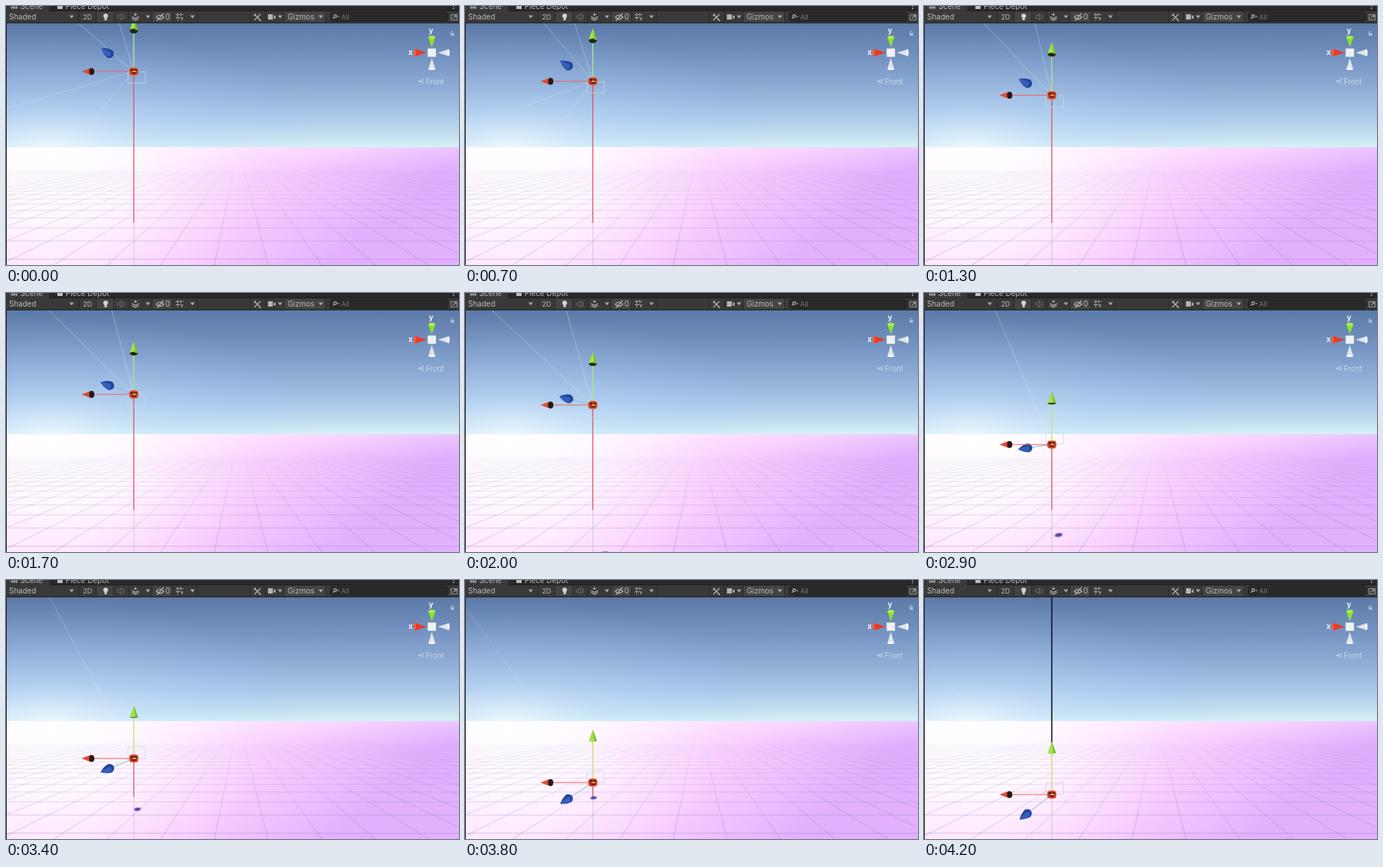
Write an HTML page that moves like this. It is 600 by 344 pixels and loops after 4500 ms.

```html
<!DOCTYPE html>
<html lang="en">
<head>
<meta charset="utf-8">
<style>
html, body { margin: 0; width: 600px; height: 344px; overflow: hidden; background: #282828; }
svg { display: block; }
text { font: 10px Inter, Roboto, sans-serif; fill: #bdbdbd; }
.small { font-size: 9px; }
.axis { font-weight: 600; fill: #fff; }
.icon { fill: none; stroke: #b4b4b4; stroke-width: 1.2; }
</style>
</head>
<body>
<svg width="600" height="344" viewBox="0 0 600 344">
  <defs>
    <linearGradient id="sky" x2="0" y2="1">
      <stop offset="0" stop-color="#5c79a7"/>
      <stop offset=".25" stop-color="#7190be"/>
      <stop offset=".5" stop-color="#8caad3"/>
      <stop offset=".75" stop-color="#aac8e8"/>
      <stop offset=".92" stop-color="#c8e2f1"/>
      <stop offset="1" stop-color="#d8f3f5"/>
    </linearGradient>
    <radialGradient id="skyGlow" gradientUnits="userSpaceOnUse" cx="0" cy="0" r="1" gradientTransform="translate(60 190) scale(360 160)">
      <stop offset="0" stop-color="#f4fbff" stop-opacity=".75"/>
      <stop offset=".35" stop-color="#c4e0ff" stop-opacity=".38"/>
      <stop offset="1" stop-color="#a0c8ff" stop-opacity="0"/>
    </radialGradient>
    <linearGradient id="ground" gradientUnits="userSpaceOnUse" x1="260" y1="180" x2="420" y2="360">
      <stop offset="0" stop-color="#ffe2ff"/>
      <stop offset=".45" stop-color="#f8cdff"/>
      <stop offset="1" stop-color="#e2b0ff"/>
    </linearGradient>
    <radialGradient id="glow" gradientUnits="userSpaceOnUse" cx="0" cy="0" r="1" gradientTransform="translate(60 200) scale(280 210)">
      <stop offset="0" stop-color="#fff"/>
      <stop offset=".4" stop-color="#fff" stop-opacity=".75"/>
      <stop offset="1" stop-color="#ffe6ff" stop-opacity="0"/>
    </radialGradient>
    <linearGradient id="haze" x2="0" y2="1">
      <stop offset="0" stop-color="#fff" stop-opacity=".25"/>
      <stop offset="1" stop-color="#fff" stop-opacity="0"/>
    </linearGradient>
    <linearGradient id="gridFade" gradientUnits="userSpaceOnUse" x1="0" y1="203" x2="0" y2="344">
      <stop offset="0" stop-color="#8478b4" stop-opacity="0"/>
      <stop offset=".35" stop-color="#8478b4" stop-opacity=".16"/>
      <stop offset="1" stop-color="#8478b4" stop-opacity=".38"/>
    </linearGradient>
    <clipPath id="view"><path d="M1 23H600V344H1z"/></clipPath>
    <path id="arrow" d="M-3-2h6L0 2z" fill="#a8a8a8"/>
  </defs>

  <g clip-path="url(#view)">
    <path fill="url(#sky)" d="M0 23H600V188H0z"/>
    <path fill="url(#skyGlow)" d="M0 23H600V188H0z"/>
    <path fill="url(#ground)" d="M0 187.500H600V344H0z"/>
    <path fill="url(#glow)" d="M0 187.500H600V344H0z"/>
    <path fill="url(#haze)" d="M0 187.500H600V215H0z"/>
    <path id="grid" fill="none" stroke="url(#gridFade)"/>
    <path stroke="#9aa3a8" stroke-opacity=".4" d="M169.500 200V344"/>
    <g id="scene"></g>
  </g>
  <path d="M.5 23V344" stroke="#1c1c22"/>

  <g id="compass">
    <path fill="#8be32b" d="M559.500 42 564 55 568.500 42z"/>
    <ellipse cx="564" cy="41.500" rx="4.500" ry="2" fill="#a5f04a"/>
    <path fill="#ec3a22" d="M541.500 57 557 62 541.500 67z"/>
    <ellipse cx="541.500" cy="62" rx="1.500" ry="5" fill="#fa5a3c"/>
    <path fill="#dfe4ea" d="M586 57.500 572 62 586 66.500z"/>
    <ellipse cx="586" cy="62" rx="1.500" ry="4.500" fill="#f5f7fa"/>
    <path fill="#dfe4ea" d="M559.500 83.500 564 69 568.500 83.500z"/>
    <ellipse cx="564" cy="83.500" rx="4.500" ry="1.500" fill="#f5f7fa"/>
    <path fill="#f0f1f3" d="M558.500 56.500h11v11h-11z"/>
    <text class="axis" x="560" y="36">y</text>
    <text class="axis" x="533" y="65">x</text>
    <path d="M554 97 546 100 554 103M546 100h8" fill="none" stroke="#c8d6ea" stroke-opacity=".8"/>
    <text x="556" y="103.500" style="fill:#c8d6ea">Front</text>
    <path fill="#c2cede" fill-opacity=".8" d="M589 36h4.500v3.500H589z"/>
    <path d="M589.500 36v-1.500q1.500-2 3 0" fill="none" stroke="#c2cede" stroke-opacity=".8"/>
  </g>

  <path fill="#282828" d="M0 0H600V7H0z"/>
  <path fill="#393939" d="M0 0H57V7H0zM0 7H600V22H0z"/>
  <path fill="#202020" d="M0 22H600v1H0zM57 6H600v1H57z"/>
  <path fill="#444" d="M120 8h22v13h-22zM194 8h26v13h-26zM369 8h54v13h-54z"/>
  <path stroke="#2a2a2a" d="M96.500 7V22M119.500 7V22M142.500 7V22M162.500 7V22M193.500 7V22M220.500 7V22M253.500 7V22M323.500 7V22M343.500 7V22M368.500 7V22M423.500 7V22"/>
  <path class="icon" d="M8 0V4M11 0V4M14 0V4M6.500 2H15"/>
  <text x="19" y="3.500">Scene</text>
  <path fill="#bdbdbd" d="M68 0h7v4h-7z"/>
  <text x="79" y="3.500">Piece Depot</text>
  <path fill="#bdbdbd" d="M592 0h1.500v1H592zM592 2.500h1.500V4H592z"/>
  <text x="4" y="18">Shaded</text>
  <text class="small" x="102" y="18">2D</text>
  <path fill="#d0d0d0" d="M130.500 16.500q-2.500-2.500-1.500-5 3-3 6 0 1 2.500-1.500 5v2.500h-3z"/>
  <path class="icon" stroke-opacity=".35" d="M148 13h2l3-2.500v8l-3-2.500h-2zM155.500 11q2 3.500 0 7"/>
  <path class="icon" d="M167 14 171.500 16.500 176 14M167 16.500 171.500 19 176 16.500M171.500 13V9.500M169.500 11.500h4"/>
  <path class="icon" d="M199 15q5-6 10 0-5 5-10 0M200 19.500 208.500 10"/>
  <text x="211" y="18">0</text>
  <path class="icon" stroke-dasharray="2 1" d="M225 11.500h10M225 15.500h6M227.500 9.500v10M231.500 9.500v4M231 15l2 2 2-2M233 17v3"/>
  <path class="icon" d="M329 11 337 19M337 11 329 19M328.500 13l2.500-2.500M335 18l2.500 2"/>
  <path fill="#b4b4b4" d="M347 11h6.500v7H347zM354.500 14l2.500-2v5.500l-2.500-2z"/>
  <text x="373" y="18">Gizmos</text>
  <g id="arrows"></g>
  <rect x="429.500" y="8.500" width="156" height="12" rx="3" fill="#2a2a2a" stroke="#222"/>
  <circle class="icon" cx="436" cy="13.500" r="1.800"/>
  <path class="icon" d="M434.500 15 433 17M439 14h2.500"/>
  <text class="small" x="444" y="17.500" style="fill:#747474">All</text>
  <path class="icon" stroke-opacity=".7" d="M589.500 11.500h8v7h-8zM592 16.500l4-4M593.500 12.500H596V15"/>
</svg>
<script>
const byId = id => document.getElementById(id);
const X = 169.3, TOP = 23, HORIZON = 187, FLOOR = 285;
const STEP = 100, LAST = 42, LOOP = 4500;

byId('arrows').innerHTML = [87, 188, 247, 363, 417]
  .map(x => `<use href="#arrow" x="${x}" y="14.5"/>`).join('');

let grid = '';
for (let k = -12; k <= 14; k++) grid += `M308 ${HORIZON}L${276 + 71 * k} 344`;
for (let k = 0; k < 20; k++) grid += `M0 ${HORIZON + 776 / (k + 5.2)}l600 .01`;
byId('grid').setAttribute('d', grid);

// Linear interpolation through [step, value] pairs
function track(n, keys) {
  const i = Math.max(1, keys.findIndex(k => k[0] >= n));
  const [a, u] = keys[i - 1], [b, v] = keys[i];
  return u + (v - u) * (n - a) / (b - a);
}
const slopeNear = [[0, -.3], [7, -.31], [13, -.235], [20, -.28], [24, -.32], [34, -.52], [42, -.93]];
const slopeFar = [[0, -1.14], [7, -.84], [13, -.94], [20, -1.06], [24, -1.18], [42, -2]];

const line = (x1, y1, x2, y2, color, width = 1, opacity = 1) =>
  `<path d="M${x1} ${y1}L${x2} ${y2}" stroke="${color}" stroke-width="${width}" stroke-opacity="${opacity}"/>`;
const oval = (x, y, rx, ry, color, extra = '') =>
  `<ellipse cx="${x}" cy="${y}" rx="${rx}" ry="${ry}" fill="${color}" ${extra}/>`;
const shape = (d, color) => `<path d="${d}" fill="${color}"/>`;

function rays(n, y) {
  const up = (slope, alpha) => line(X, y, X + slope * (y - TOP), TOP, '#e4eefa', 1, alpha);
  let out = up(track(n, slopeNear), n < 24 ? .35 : track(n, [[24, .35], [34, .28], [42, .1]]));
  if (n < 30) out += up(track(n, slopeFar), .35 * Math.min(1, (30 - n) / 5));
  if (n < 11) {
    const p = n / 7, alpha = .28 * Math.min(1, (11 - n) / 4);
    out += line(X, y, X - 169 + 80 * p, y + 49 - 16 * p, '#e4eefa', 1, alpha);
    out += line(X, y, X - 49 + 10 * p, y + 57 - 5 * p, '#e4eefa', 1, alpha);
  }
  return out;
}

function draw(n) {
  const y = Math.min(FLOOR, 87 + 1.2 * n + .0945 * n * n);
  const landed = y === FLOOR;
  const dz = .265 * (y - 183);
  const base = y - 54, baseRy = Math.abs(HORIZON - base) * .026;
  const boxY = y < HORIZON ? y + .5 : y - 15.5;
  const tilt = Math.atan2(dz, -35) * 180 / Math.PI;

  let out = rays(n, y);
  if (landed) out += line(X, TOP, X, y - 68, '#10161c', 1.6);
  else {
    const sy = 304 - .475 * (y - 238);
    const sx = 174 - .117 * (y - 238);
    const size = track(sy, [[280, 4.5], [303, 5], [335, 6.5], [380, 8]]);
    out += oval(sx, sy, size, size * .5, '#a48ade', `transform="rotate(-12 ${sx} ${sy})"`)
      + oval(sx, sy, size * .65, size * .32, '#5446a4')
      + line(X, y, X, 288, '#de4c52', 1.2);
  }
  out += `<rect x="161.5" y="${boxY}" width="23" height="15" fill="none" stroke="#c0dcec" stroke-opacity=".7"/>`;

  out += line(X, y, X - 28, y + dz * .8, '#82b8ea')
    + `<g transform="translate(134.500 ${y + dz}) rotate(${tilt})">`
    + shape('M10 0Q3-5.500-4-6Q-9-4-9 0Q-9 4-4 6Q3 5.500 10 0z', '#24459a')
    + shape('M10 0Q3-4.500-4-4.500Q-6 0-4 2Q3 2 10 0z', '#3560be') + '</g>';

  out += line(116, y, 163, y, '#f0645a', 1.1)
    + shape(`M100 ${y}L113 ${y - 5}V${y + 5}z`, '#e24c36')
    + oval(113.5, y, 3.5, 4.6, '#241a1a');

  out += line(X, base, X, y - 5, y < 150 ? '#a6e48c' : '#d4dc80', 1.5)
    + (base < HORIZON ? oval(X, base - 1, 5.5, baseRy + .6, '#1c2614') : '')
    + shape(`M${X} ${y - 70.5}L${X + 5.5} ${base - 1}Q${X} ${base + (base < HORIZON ? -1 - baseRy : 1)} ${X - 5.5} ${base - 1}z`, '#a0e44a')
    + shape(`M${X} ${y - 70.5}L${X + 5.5} ${base - 1}H${X + 2}z`, '#7cb838');

  out += `<rect x="163.500" y="${y - 5}" width="11.500" height="10" rx="3.500" fill="#c8382c" stroke="#f46a34"/>`
    + shape(`M165 ${y - 3}h4v2h-4zM170.500 ${y - 3}h3v2h-3zM167 ${y + 1}h5v2h-5z`, '#3c2a26')
    + shape(`M168 ${y - 1}h4v2h-4z`, '#e0a848');
  byId('scene').innerHTML = out;
}

let shown = -1;
function tick() {
  const n = Math.min(LAST, Math.floor(performance.now() % LOOP / STEP));
  if (n !== shown) draw(shown = n);
  requestAnimationFrame(tick);
}
tick();
</script>
</body>
</html>
```
